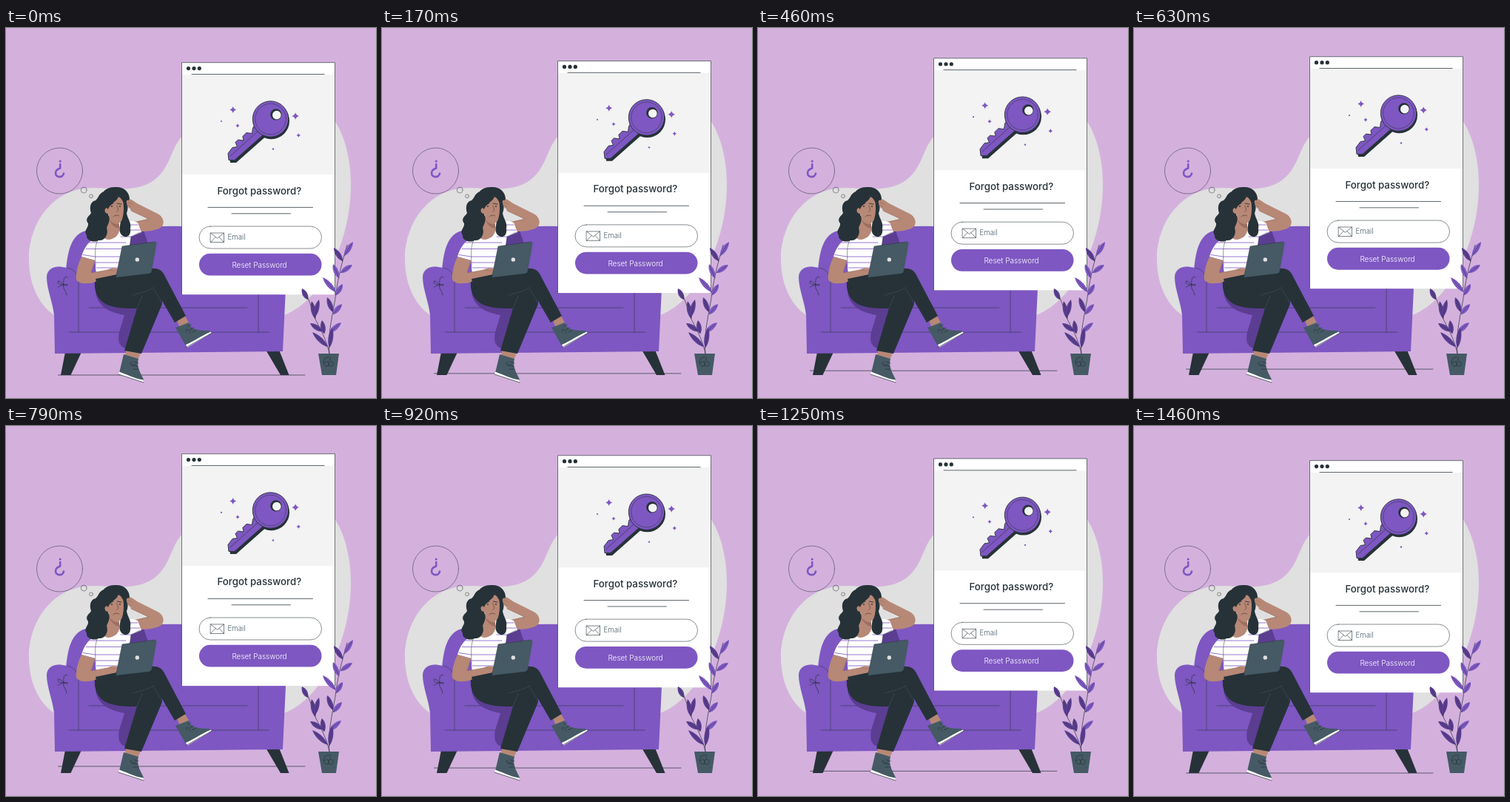
Animation of 500 by 500 pixels, one loop 1.5 s. Source, as an HTML page with a canvas:

```html
<!DOCTYPE html>
<html lang="en">
<head>
<meta charset="utf-8">
<title>Forgot password</title>
<style>
html, body { margin: 0; width: 100%; height: 100%; overflow: hidden; background: #d4b1dd; }
canvas { display: block; width: 100vw; height: 100vh; }
</style>
</head>
<body>
<canvas id="stage" width="500" height="500"></canvas>
<script>
const ctx = document.getElementById('stage').getContext('2d');
const PURPLE = '#7e57c2', SHADE = '#5b3d92', DARK = '#263238', SLATE = '#455a64';
const SKIN = '#b78876', SKIN_SHADE = '#9c6f60', WHITE = '#fff', GREY = '#e0e0e0';
const LOOP = 1500, FPS = 24, RISE = 9.3, PEAK = 17.5;

function fill(d, color) {
  ctx.fillStyle = color;
  ctx.fill(new Path2D(d));
}
function line(d, color = DARK, width = 0.7) {
  ctx.strokeStyle = color;
  ctx.lineWidth = width;
  ctx.stroke(new Path2D(d));
}
// Paints the current path: an outline when a width is given, else a fill.
function paint(color, width) {
  ctx.fillStyle = ctx.strokeStyle = color;
  ctx.lineWidth = width || 1;
  if (width) ctx.stroke();
  else ctx.fill();
}
function circle(x, y, r, color, width) {
  ctx.beginPath();
  ctx.arc(x, y, r, 0, Math.PI * 2);
  paint(color, width);
}
function pill(x, y, w, h, color, width) {
  ctx.beginPath();
  ctx.roundRect(x, y, w, h, h / 2);
  paint(color, width);
}
function text(str, x, y, font, color, align = 'center') {
  ctx.font = font + ' Inter, "Open Sans", sans-serif';
  ctx.textAlign = align;
  ctx.fillStyle = color;
  ctx.fillText(str, x, y);
}
function star(x, y, r) {
  const k = r * 0.22;
  fill(`M${x} ${y - r}Q${x + k} ${y - k} ${x + r} ${y}Q${x + k} ${y + k} ${x} ${y + r}` +
    `Q${x - k} ${y + k} ${x - r} ${y}Q${x - k} ${y - k} ${x} ${y - r}Z`, PURPLE);
}
// Leaf from its base to its tip, with a centre vein.
function leaf(x, y, tipX, tipY, color = PURPLE) {
  const length = Math.hypot(tipX - x, tipY - y);
  ctx.save();
  ctx.translate(x, y);
  ctx.rotate(Math.atan2(tipY - y, tipX - x));
  fill(`M0 0C${length * 0.25} -4.6 ${length * 0.7} -4.6 ${length} 0C${length * 0.7} 4.2 ${length * 0.25} 4.2 0 0Z`, color);
  line(`M0 0H${length * 0.85}`, DARK, 0.4);
  ctx.restore();
}

function drawBackdrop() {
  ctx.fillStyle = '#d4b1dd';
  ctx.fillRect(0, 0, 500, 500);
  fill('M65 388C42 372 31 343 31 312C31 266 61 216 118 216C142 216 163 220 183 214C222 202 220 165 238 146' +
    'C275 80 370 70 444 125C459 148 466 180 466 212C466 282 432 366 376 388Z', GREY);
  circle(72.5, 193, 31, DARK, 0.5);
  circle(105.2, 219, 3.9, DARK, 0.5);
  circle(115, 227.3, 2.4, DARK, 0.5);
  circle(73.2, 180, 1.6, PURPLE);
  line('M73.2 184V189.5C70 190.5 67 192 67 196C67 202.5 77 203 78 196.5', PURPLE, 2.6);
}

function drawSofa() {
  fill('M80 438H102L87.5 469H74Z', DARK);
  fill('M351 435H369L382.5 469H371Z', DARK);
  fill('M80 350C81 300 88 275 114 273C145 270 170 272 190 269Q214 267 245 268H340V400H82Z', PURPLE);
  fill('M66 440L65 388C63 370 55 352 55 337C55 326 65 321 76 323C90 324 98 331 98 345V362H300V330H379L374 437Z', PURPLE);
  line('M83 324C90 325 98 331 98 345V411', DARK, 0.5);
  line('M85 411H355M112 378H168M204 378H326M341 345V411', DARK, 0.55);
  line('M78 347C72 340 68 341 71 345C73 348 77 346 78 347C77 338 80 334 83 337M78 347C86 345 85 350 78 347' +
    'C76 352 81 354 82 361M78 347C73 348 71 351 70 350', DARK, 0.7);
  fill('M121 358C125 377 139 384 160 388L153 411C151 422 152 431 164 434L190 400L186 360Z', SHADE);
  fill('M166 282L186 274L192 291L163 297Z', SHADE);
}

function drawKey() {
  const blade = 'M337 130L333.5 135L332.5 142.5L325 141.5L319.8 146.5L321.2 152L313.5 151L310 154.5L312.5 160.5L306 161.5L300 169.5L301 178.5L309 178.5L348 144Z';
  ctx.save();
  ctx.translate(0.5, 2.2);
  circle(358, 123.5, 24.5, DARK);
  ctx.translate(1.5, 1.3);
  fill(blade, DARK);
  ctx.restore();
  fill(blade, PURPLE);
  line(blade, DARK, 0.9);
  circle(357.5, 123, 24.2, PURPLE);
  circle(357.5, 123, 24.2, DARK, 0.9);
  circle(357.5, 123, 20.8, DARK, 0.5);
  line('M303 173L340 140', DARK, 0.6);
  circle(364.8, 116.8, 7.6, DARK);
  circle(365.8, 117.6, 5.8, '#f4f4f4');
  star(306.7, 110.5, 4.5);
  star(391.2, 119, 4.8);
  star(313, 132, 2.7);
  star(395.3, 145, 2.8);
  circle(291, 126, 1.1, PURPLE);
  circle(361, 163.5, 1.2, PURPLE);
}

function drawPanel() {
  ctx.fillStyle = WHITE;
  ctx.fillRect(237.5, 46.7, 207, 313.5);
  ctx.fillStyle = '#f3f3f3';
  ctx.fillRect(238, 63, 206, 135);
  line('M237.5 360V46.7H444.5V360', DARK, 0.65);
  line('M251 62.5H430', DARK, 0.75);
  for (const x of [246.5, 254, 261.3]) circle(x, 54.6, 2.6, DARK);
  drawKey();
  text('Forgot password?', 342.3, 224.5, '500 13.3px', DARK);
  line('M273 242.4H414.5M305 250.8H384.5', DARK, 0.75);
  pill(261, 268, 165.5, 30, DARK, 0.55);
  line('M276.5 277H294.5V289.5H276.5ZL285.5 284.3L294.5 277M276.5 289.5L283 282.5M294.5 289.5L288 282.5', DARK, 0.6);
  text('Email', 299.5, 286, '300 9.7px', SLATE, 'left');
  pill(261, 304.8, 165.5, 29.8, PURPLE);
  text('Reset Password', 342.5, 323.7, '300 10px', WHITE);
}

function drawShoes() {
  fill('M231 395L242 389L247 398L235 405Z', SKIN);
  fill('M162 435L182 439L178 449L161 444Z', SKIN);
  fill('M229 405L247 398C249 407 259 409 274 409L277 411L243 429.5Z', SLATE);
  fill('M243 428C255 423 265 415 277 410.5L277.5 412.5L245 431.8Z', WHITE);
  line('M243 431.8L277.5 412.5M246 403L250 401M248 408L253 405M252 411L257 408M244 411C241 407 246 405 249 412', DARK, 0.7);
  fill('M159 441L179 447C176 457 181 465 186 475L185 477L153 466Z', SLATE);
  fill('M153 464.5C163 468 174 474 185.5 475.5L186 479L152 468Z', WHITE);
  line('M152 468L186 479M173 451L179 453M171 456L178 457M172 461L179 461M170 452C164 453 172 458 175 454', DARK, 0.7);
}

function drawLegs() {
  fill('M120 343C145 336 176 328 195 325C204 324 211 327 214 334L243 389L228 398L200 350Z', DARK);
  fill('M120 343L199 345C207 351 211 361 211 373L183 440L160 436L177 379C168 379 147 380 133 372C122 365 119 353 120 343Z', DARK);
  line('M171 361C180 358 190 357 199 351M199 351L211 372M177 379L184 362', SLATE, 0.5);
}

function drawBody() {
  // Raised arm
  fill('M164 231C170 230 174 236 179 238L205 251C213 255 215 264 210 269C204 274 190 275 178 275L173 262L192 258L169 247Z', SKIN);
  line('M169 247L193 258L178 262', SKIN_SHADE, 0.6);
  // Shirt
  fill('M119 285C132 274 143 265 158 262C165 259 173 261 178 263L183 276L169 282L167 297L153 333H122L120 314L102 309C105 298 111 289 119 285Z', WHITE);
  line('M113 290H162M108 298.5H167M104 306.5L120 309H160M121 317H158M122 324H155M155 282H171M164 273H181M163 266H178', PURPLE, 0.8);
  line('M124 286C119 296 121 310 121 322', DARK, 0.5);
  line('M181 276L169 282L167 296', DARK, 0.5);
  // Typing arm
  fill('M102 309L120 314L115 331L137 327C143 323 149 324 152 326L150 335L121 343C112 346 99 347 95 340C94 330 98 317 102 309Z', SKIN);
  line('M120 314L115 331L137 327M137 327L147 328', SKIN_SHADE, 0.6);
}

function drawHead() {
  // Neck and the hair falling on both sides of it
  fill('M135 252L153 260L153 271C154 279 147 285 139 286C132 286 129 281 133 274Z', SKIN);
  fill('M140 259C144 264 149 266 153 265V271C147 270 142 266 140 259Z', SKIN_SHADE);
  fill('M148 215C158 214 167 221 167 231C163 237 166 244 163 250C164 258 170 263 168 271C169 278 166 283 160 282' +
    'C155 280 152 275 154 267L158 240L140 240L138 252C142 259 138 265 136 270C139 278 134 288 125 287' +
    'C119 291 108 287 109 280C104 274 112 270 111 264C106 257 113 254 115 250C112 241 115 234 121 233' +
    'C125 230 125 224 132 221C136 216 142 215 148 215Z', DARK);
  // Face under the fringe
  fill('M140 233C147 225 155 226 158 233C160 244 159 254 156 261C151 266 144 262 141 256L138 251C133 251 132 244 136 243L138 245Z', SKIN);
  fill('M138 244C135 235 140 225 149 223C157 224 160 229 161 238C157 235 157 230 152 228C150 234 143 236 138 244Z', DARK);
  line('M139.5 239L145 237M150 237L156 238', DARK, 0.9);
  line('M150 240C151 244 153 246 150 248M145 255C147 252.5 151 252.5 153 254', '#5b3c35', 0.7);
  circle(143, 241, 0.9, DARK);
  circle(154, 241, 0.9, DARK);
  // Supporting hand
  fill('M163 233C169 231 174 235 180 239L174 247C166 245 162 240 163 233Z', SKIN);
  line('M164 235L171 238M164 238L169 242', SKIN_SHADE, 0.6);
}

function drawLaptop() {
  fill('M121 339L150 333L197 330L195 335L122 343Z', DARK);
  fill('M157 295L201 289Q204 289 203.5 292L197 328Q196 332 192 332L148.5 337Z', SLATE);
  line('M148.5 337L157 295L201 289', DARK, 0.5);
  circle(177.3, 313, 2.7, GREY);
}

function drawPlant() {
  line('M437 442C434 410 443 383 446 358C449 335 454 318 461 293M437 440C431 412 418 398 414 383C411 370 407 362 403 355', DARK, 0.7);
  leaf(457, 308, 469, 289);
  leaf(455, 315, 443, 297, SHADE);
  leaf(452, 331, 468, 320);
  leaf(450, 338, 442, 319);
  leaf(446, 357, 428, 337);
  leaf(446, 361, 455, 346);
  leaf(442, 384, 434, 364, SHADE);
  leaf(442, 387, 454, 373);
  leaf(437, 412, 453, 398);
  leaf(408, 367, 400, 352, SHADE);
  leaf(418, 393, 413, 369, SHADE);
  leaf(417, 391, 423, 367, SHADE);
  leaf(428, 410, 411, 399, SHADE);
  leaf(430, 413, 427, 395, SHADE);
  leaf(435, 431, 414, 411, SHADE);
  leaf(437, 432, 441, 405, SHADE);
  fill('M422 440H450L446 469H427Z', SLATE);
  line('M432 446C426 450 430 460 436 456C441 460 445 453 440 451C437 449 434 453 437 455M432 446C437 442 441 447 437 449M430 453C433 449 437 450 436 456', DARK, 0.7);
}

function floating(offset, draw) {
  ctx.save();
  ctx.translate(0, offset);
  draw();
  ctx.restore();
}

function render(now) {
  const step = Math.floor((now % LOOP) * FPS / 1000);
  const offset = -RISE * Math.max(0, 1 - Math.abs(step - PEAK) / PEAK);
  ctx.lineCap = 'round';
  ctx.lineJoin = 'round';
  drawBackdrop();
  floating(offset, () => line('M70.5 469H404', DARK, 0.7));
  drawSofa();
  floating(offset, drawPanel);
  drawShoes();
  drawBody();
  drawLegs();
  drawLaptop();
  drawHead();
  drawPlant();
}

const start = performance.now();
function tick() {
  render(performance.now() - start);
  requestAnimationFrame(tick);
}
tick();
</script>
</body>
</html>
```
